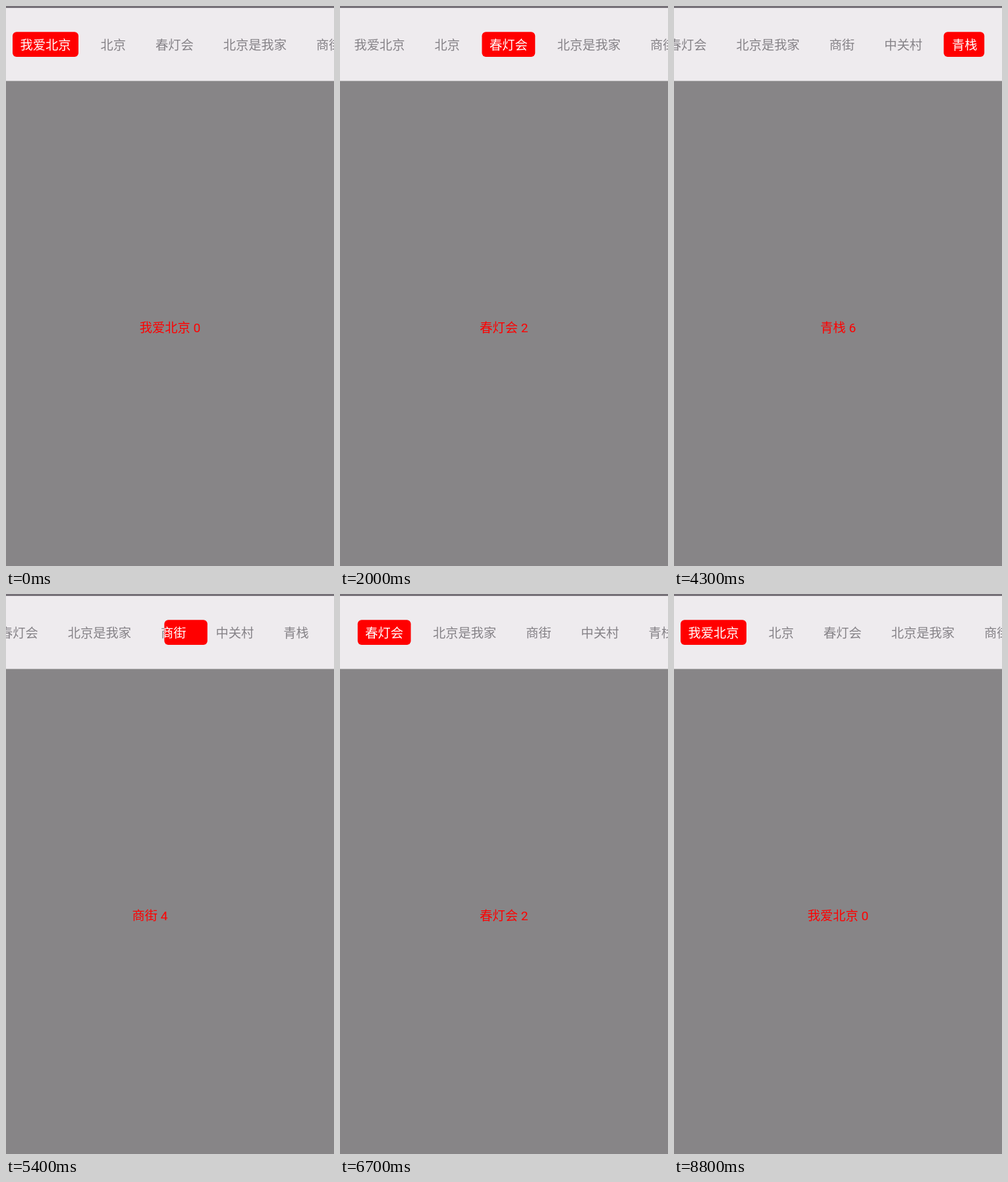
An HTML page with a canvas that plays this animation: 498 px wide and 848 px high, repeating every 8900 ms.

```html
<!DOCTYPE html>
<html lang="zh-CN">
<head>
<meta charset="utf-8">
<style>
  html, body { margin: 0; width: 100%; height: 100%; overflow: hidden; background: #878587; }
  canvas { display: block; }
</style>
</head>
<body>
<canvas width="498" height="848"></canvas>
<script>
const W = 498, H = 848, LOOP = 8900;
const FONT = 19.25, GAP = 45, PAD = 11.5, EDGE = 26.8;
const SETTLE = 300, PILL_LAG = 52, DRAG_SHARE = 0.43, TURN = 4550;
const ctx = document.querySelector('canvas').getContext('2d');

let nextX = 21.5;
const tabs = ['我爱北京', '北京', '春灯会', '北京是我家', '商街', '中关村', '青栈'].map(label => {
  const x = nextX, width = label.length * FONT;
  nextX += width + GAP;
  return { label, x, left: x - PAD, right: x + width + PAD };
});

// Each swipe: drag start, release, page reached
const swipes = [
  [350, 863, 1], [1250, 1605, 2], [2250, 2480, 3], [2700, 2898, 4],
  [3450, 3680, 5], [3880, 4080, 6], [4550, 4780, 5], [5080, 5293, 4],
  [5710, 5846, 3], [6230, 6400, 2], [6830, 7080, 1], [7530, 7850, 0]
];

const lerp = (a, b, k) => a + (b - a) * k;

function swipeShare(t, start, release) {
  if (t < release) return DRAG_SHARE * ((t - start) / (release - start)) ** 1.5;
  const rest = Math.max(0, 1 - (t - release) / SETTLE);
  return 1 - (1 - DRAG_SHARE) * rest ** 5;
}

function pageAt(t) {
  let page = 0;
  for (const [start, release, to] of swipes) {
    if (t < start) break;
    page = lerp(page, to, swipeShare(t, start, release));
    if (t < release + SETTLE) break;
  }
  return page;
}

function pillAt(t) {
  const page = pageAt(t - PILL_LAG), i = Math.floor(page);
  const a = tabs[i], b = tabs[Math.min(i + 1, tabs.length - 1)];
  return { left: lerp(a.left, b.left, page - i), right: lerp(a.right, b.right, page - i) };
}

// The bar scrolls just enough to keep the pill inside both edges
function scrollAt(t, pill) {
  const maxScroll = tabs[tabs.length - 1].right - W + EDGE;
  const wanted = t < TURN ? pill.right - W + EDGE : pill.left - EDGE;
  return Math.min(maxScroll, Math.max(0, wanted));
}

function drawLabels(color) {
  ctx.fillStyle = color;
  for (const tab of tabs) ctx.fillText(tab.label, tab.x, 65.8);
}

function fillBox(color, y, height) {
  ctx.fillStyle = color;
  ctx.fillRect(0, y, W, height);
}

function draw(t) {
  fillBox('#878587', 0, H);
  ctx.font = `${FONT}px Roboto, "Noto Sans CJK SC", "Noto Sans CJK", sans-serif`;

  const page = pageAt(t);
  ctx.textAlign = 'center';
  ctx.fillStyle = '#f00';
  tabs.forEach((tab, i) => ctx.fillText(`${tab.label} ${i}`, W / 2 + (i - page) * W, 493.6));

  fillBox('#eeebee', 0, 113.5);
  fillBox('#757077', 0, 3);

  const pill = pillAt(t);
  ctx.save();
  ctx.translate(-scrollAt(t, pill), 0);
  ctx.textAlign = 'left';
  drawLabels('#858287');
  ctx.beginPath();
  ctx.roundRect(pill.left, 39.3, pill.right - pill.left, 37.6, 6);
  ctx.fillStyle = '#f00';
  ctx.fill();
  ctx.clip();
  drawLabels('#fff');
  ctx.restore();
}

function tick() {
  draw(performance.now() % LOOP);
  requestAnimationFrame(tick);
}
tick();
</script>
</body>
</html>
```
